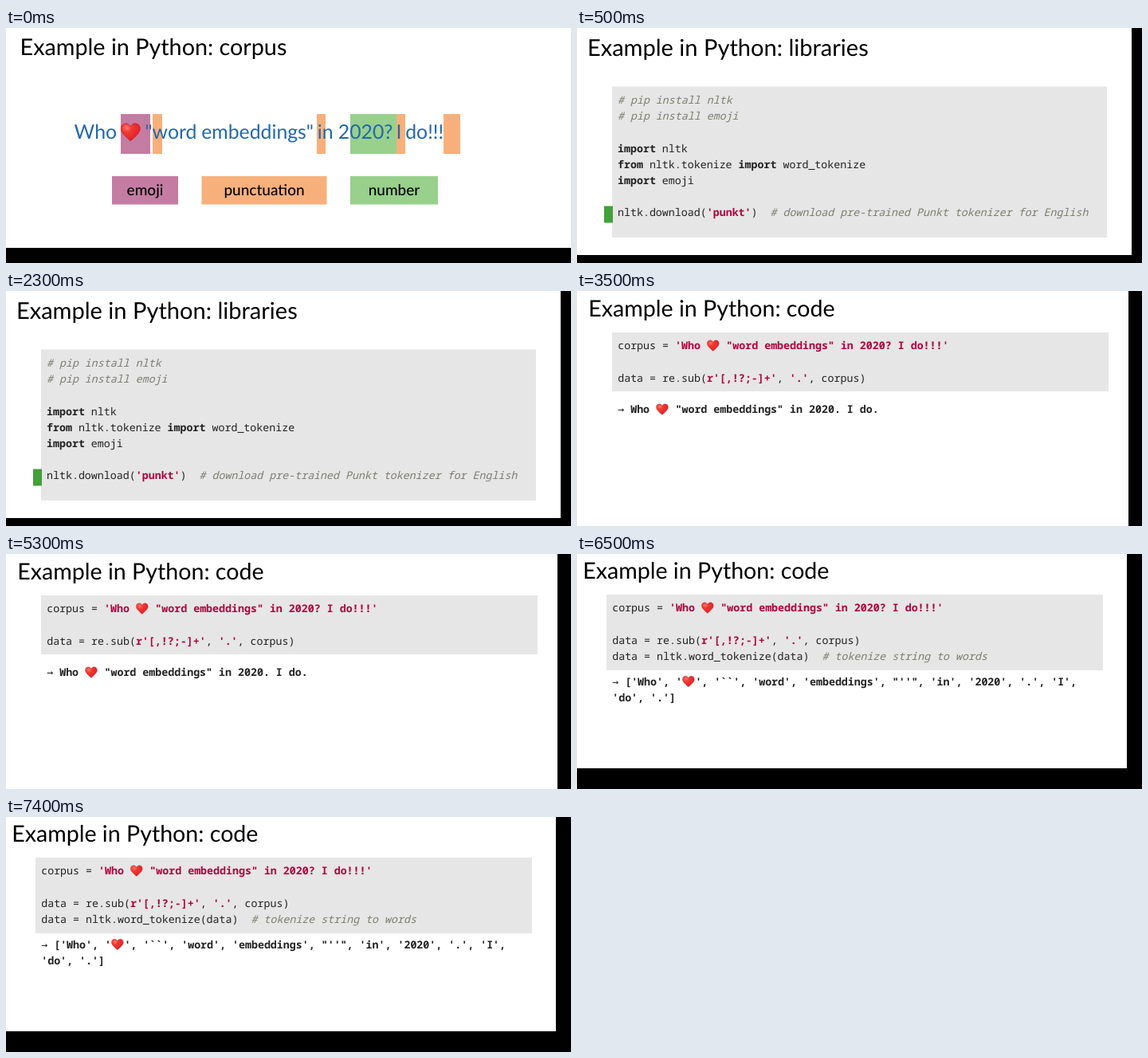
These frames come from a looping animation (709 by 295 pixels, 8000 ms). An HTML page:

```html
<!DOCTYPE html>
<html lang="en">
<head>
<meta charset="utf-8">
<title>Tokenizing a corpus in Python</title>
<style>
html, body { margin: 0; width: 100%; height: 100%; overflow: hidden; background: #fff; }
svg { display: block; width: 100%; height: 100%; }
text { white-space: pre; text-rendering: geometricPrecision; font-variant-ligatures: none; fill: #000; }
.title { font-family: Lato, sans-serif; }
.body { font: 24.8px Lato, sans-serif; fill: #2268ae; }
.label { font: 500 19px Lato, sans-serif; text-anchor: middle; }
.code { font: 500 13.3px "Noto Sans Mono", "DejaVu Sans Mono", monospace; fill: #222; }
.code .b { font-weight: 600; }
.code .s { font-weight: 600; fill: #b0003f; }
.code .c { font-style: italic; fill: #7d7d6f; }
.code .a { font-family: "DejaVu Sans Mono", monospace; }
</style>
</head>
<body>
<svg id="stage" viewBox="0 0 709 295" preserveAspectRatio="none">
  <defs>
    <radialGradient id="red" cx=".3" cy=".25" r=".85">
      <stop offset="0" stop-color="#ff7a6c"/>
      <stop offset=".3" stop-color="#f03a33"/>
      <stop offset=".75" stop-color="#e5262a"/>
      <stop offset="1" stop-color="#c01420"/>
    </radialGradient>
  </defs>
</svg>
<script>
const NS = "http://www.w3.org/2000/svg";
const stage = document.getElementById("stage");
const HEART = "M12 22C9 19 0 13 0 6.5C0 2.5 3 0 6.2 0C9 0 11 1.8 12 4" +
  "C13 1.8 15 0 17.8 0C21 0 24 2.5 24 6.5C24 13 15 19 12 22Z";
const PURPLE = "#c57ca2", ORANGE = "#f7b07b", GREEN = "#98d08c", GREY = "#e6e6e6";
const CHAR = 7.98, EMOJI = 16.4, LINE = 20.2;

function add(parent, tag, attrs, content) {
  const el = document.createElementNS(NS, tag);
  for (const key in attrs) el.setAttribute(key, attrs[key]);
  if (content) el.textContent = content;
  return parent.appendChild(el);
}

const rect = (g, x, y, right, bottom, fill) =>
  add(g, "rect", { x, y, width: right - x, height: bottom - y, fill });

const text = (g, cls, x, y, content) => add(g, "text", { class: cls, x, y }, content);

const heart = (g, x, y, scale) => add(g, "path", {
  d: HEART, fill: "url(#red)", stroke: "#b5121b", "stroke-width": 0.5,
  transform: `translate(${x} ${y}) scale(${scale})`
});

// Runs alternate style and string; the style "h" stands for a heart.
function code(g, x, y, ...runs) {
  for (let i = 0; i < runs.length; i += 2) {
    const [style, str] = [runs[i], runs[i + 1]];
    if (style === "h") {
      heart(g, x + 0.4, y - 11.6, 0.62);
      x += EMOJI;
    } else {
      const t = add(g, "text", { class: "code", x, y });
      add(t, "tspan", { class: style }, str);
      x += str.length * CHAR;
    }
  }
}

function scene(right, bottom, title, x, y, size) {
  const g = add(stage, "g", { visibility: "hidden" });
  rect(g, 0, 0, 709, 295, "#000");
  rect(g, 0, 0, right, bottom, "#fff");
  text(g, "title", x, y, "Example in Python: " + title).setAttribute("font-size", size);
  return g;
}

function corpusScene() {
  const g = scene(709, 276, "corpus", 17.6, 34.4, 28.75);
  const marks = [[144, 181, PURPLE], [184, 196, ORANGE], [390, 401, ORANGE],
    [432, 490, GREEN], [490, 501, ORANGE], [549, 570, ORANGE]];
  for (const [a, b, fill] of marks) rect(g, a, 108, b, 158, fill);
  const words = [["Who", 85.6], ['"word', 174.4], ['embeddings"', 245.2], ["in", 390.8],
    ["2020?", 416.8], ["I", 489.6], ["do!!!", 501.2]];
  for (const [word, x] of words) text(g, "body", x, 139.4, word);
  heart(g, 144.3, 119.8, 1);
  const labels = [["emoji", 133, 216, PURPLE], ["punctuation", 245.5, 402.5, ORANGE],
    ["number", 432, 542, GREEN]];
  for (const [name, a, b, fill] of labels) {
    rect(g, a, 186, b, 221.5, fill);
    text(g, "label", (a + b) / 2, 210.2, name);
  }
  return g;
}

function librariesScene() {
  const g = scene(696, 285, "libraries", 12.9, 35.4, 29.05);
  rect(g, 44, 73.5, 665, 263, GREY);
  rect(g, 34, 223.5, 45, 244.5, "#43a03a");
  const row = (n, ...runs) => code(g, 51, 95 + n * LINE, ...runs);
  row(0, "c", "# pip install nltk");
  row(1, "c", "# pip install emoji");
  row(3, "b", "import", "", " nltk");
  row(4, "b", "from", "", " nltk.tokenize ", "b", "import", "", " word_tokenize");
  row(5, "b", "import", "", " emoji");
  row(7, "", "nltk.download(", "s", "'punkt'", "", ")  ",
    "c", "# download pre-trained Punkt tokenizer for English");
  return g;
}

function source(g, x, y) {
  code(g, x, y, "", "corpus = ", "s", "'Who ", "h", "",
    "s", ' "word embeddings" in 2020? I do!!!\'');
  code(g, x, y + 2 * LINE, "", "data = re.sub(", "s", "r'[,!?;-]+'", "", ", ",
    "s", "'.'", "", ", corpus)");
}

function subScene() {
  const g = scene(692, 295, "code", 14.3, 31.9, 28.6);
  rect(g, 44, 52, 667, 126, GREY);
  source(g, 51.2, 73.4);
  code(g, 51.2, 153.4, "a", "→", "b", " Who ", "h", "",
    "b", ' "word embeddings" in 2020. I do.');
  return g;
}

function tokenScene() {
  const g = scene(690, 269, "code", 7.2, 31.2, 28.6);
  rect(g, 37, 51, 660, 146, GREY);
  source(g, 44.2, 72.4);
  code(g, 44.2, 72.4 + 3 * LINE, "", "data = nltk.word_tokenize(data)  ",
    "c", "# tokenize string to words");
  code(g, 44.2, 164.8, "a", "→", "b", " ['Who', '", "h", "",
    "b", "', '``', 'word', 'embeddings', \"''\", 'in', '2020', '.', 'I',");
  code(g, 44.2, 164.8 + LINE, "b", "'do', '.']");
  return g;
}

const scenes = [[0, corpusScene()], [500, librariesScene()], [3500, subScene()], [6500, tokenScene()]];
const LOOP = 8000;

function draw(ms) {
  const t = ms % LOOP;
  scenes.forEach(([start, g], i) => {
    const end = i + 1 < scenes.length ? scenes[i + 1][0] : LOOP;
    g.setAttribute("visibility", t >= start && t < end ? "visible" : "hidden");
  });
}

const began = performance.now();
function tick() {
  draw(performance.now() - began);
  requestAnimationFrame(tick);
}
tick();
</script>
</body>
</html>
```
